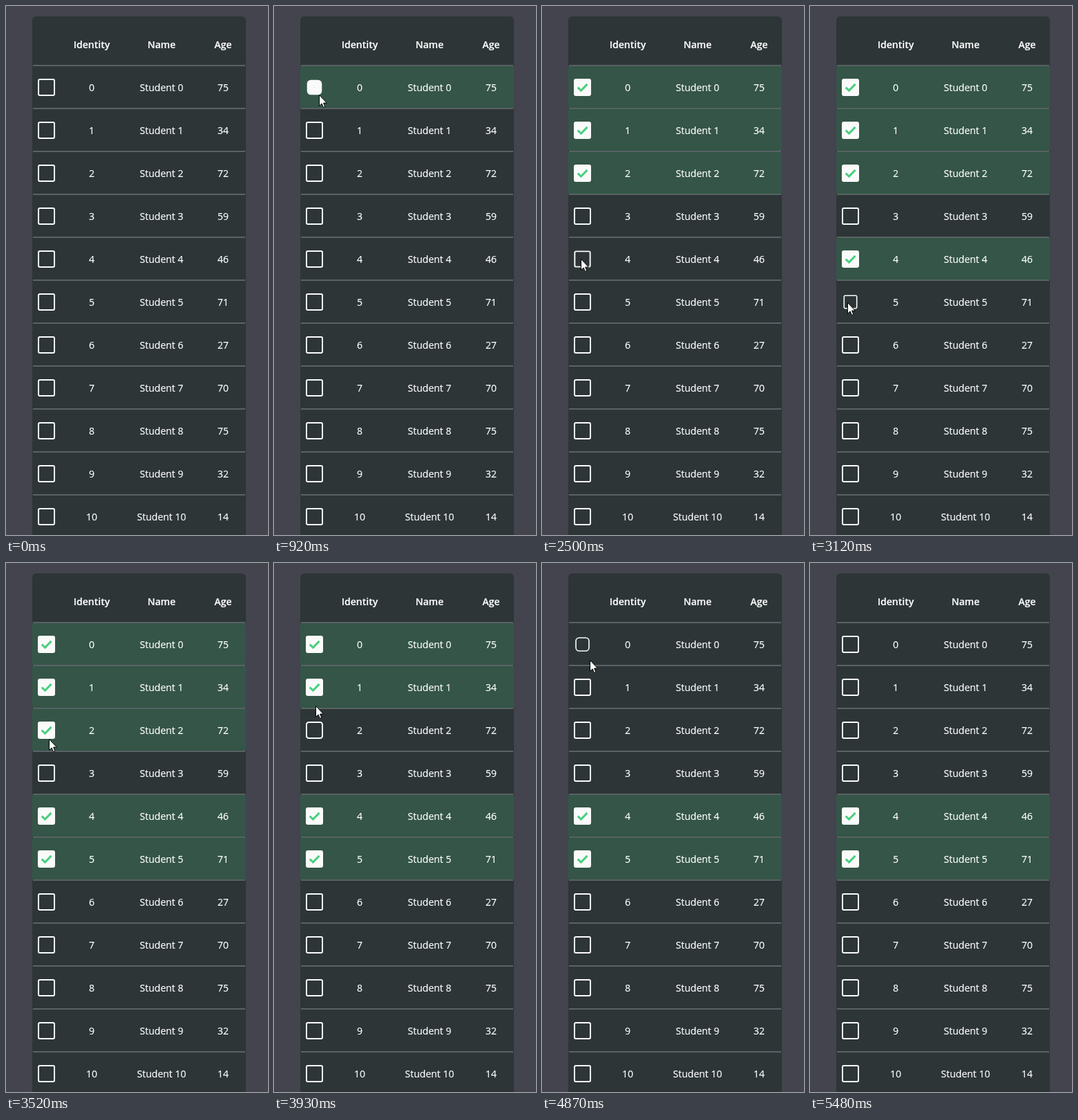
Recreate the animation shown at these times as an HTML page. Size 379 by 764 pixels, loop 5740 ms.

```html
<!DOCTYPE html>
<html lang="en">
<head>
<meta charset="utf-8">
<title>Student table</title>
<style>
  html, body { margin: 0; width: 100%; height: 100%; overflow: hidden; background: #43444d; }
  svg { display: block; width: 379px; height: 764px; }
  text {
    font: 14px "Open Sans", sans-serif; text-anchor: middle;
    fill: #fff; stroke: #fff; stroke-width: .2px;
  }
  .head { font-weight: 600; }
</style>
</head>
<body>
<svg id="stage" viewBox="0 0 379 764"></svg>
<script>
const LOOP = 5740, ENTER = 70, LEAVE = 5480;
const HOLD = 120, SHRINK = 70, GROW = 100;
const ROW_H = 62, TOP = 87;
const COLUMNS = [124, 225, 314];
const AGES = [75, 34, 72, 59, 46, 71, 27, 70, 75, 32, 14];

// each click toggles a row; up is the release time, x and y the pointer tip
const CLICKS = [
  { row: 0, up: 890, x: 65, y: 119 },
  { row: 1, up: 1420, x: 62, y: 184 },
  { row: 2, up: 1910, x: 62, y: 247 },
  { row: 4, up: 2610, x: 56, y: 365 },
  { row: 5, up: 3150, x: 54, y: 428 },
  { row: 2, up: 3760, x: 62, y: 243 },
  { row: 1, up: 4360, x: 59, y: 180 },
  { row: 0, up: 4860, x: 58, y: 118 }
];

// the pointer rests at each stop from "from" to "to" and glides between them
const STOPS = [
  { from: ENTER, to: ENTER, x: 298, y: 545 },
  { from: 400, to: 400, x: 140, y: 4 },
  ...CLICKS.map(({ up, x, y }) => ({ from: up - HOLD, to: up, x, y })),
  { from: LEAVE, to: LEAVE, x: 363, y: 755 }
];

const stage = document.getElementById('stage');

function add(tag, attrs, parent = stage, text) {
  const el = document.createElementNS('http://www.w3.org/2000/svg', tag);
  set(el, attrs);
  if (text !== undefined) el.textContent = text;
  parent.appendChild(el);
  return el;
}

function set(el, attrs) {
  for (const key in attrs) el.setAttribute(key, attrs[key]);
}

const clamp = v => Math.max(0, Math.min(1, v));
const mix = (a, b, k) => a + (b - a) * k;
const easeOut = k => 1 - (1 - k) ** 2;
const visible = on => on ? 'visible' : 'hidden';

const addLine = y => add('rect', { x: 39, y, width: 307, height: 2, fill: '#596264' });
const addTexts = (values, y, cls) => values.forEach((value, i) =>
  add('text', { x: COLUMNS[i], y, class: cls }, stage, value));

function addRow(age, i) {
  const y = TOP + i * ROW_H;
  const back = add('rect', { x: 38, y, width: 309, height: 60, fill: '#345547' });
  addLine(y + 60);
  addTexts([i, 'Student ' + i, age], y + 36, 'cell');
  const group = add('g', {});
  const box = add('rect', {
    x: -11.5, y: -11.5, width: 23, height: 23, stroke: '#fafafa', 'stroke-width': 2
  }, group);
  const check = add('path', {
    d: 'M-6.8 .2L-2 4.6L7 -4.6', fill: 'none', stroke: '#4bcf81', 'stroke-width': 3
  }, group);
  return { y: y + 30.5, back, group, box, check };
}

add('rect', { x: 38, y: 15, width: 309, height: 780, rx: 6, fill: '#2d3537' });
addTexts(['Identity', 'Name', 'Age'], 61, 'head');
addLine(TOP - 2);
const rows = AGES.map(addRow);

const pointer = add('path', {
  d: 'M.5 .5V16.3L4.1 12.9L6.4 18.4L8.8 17.5L6.6 12.1H11.4Z',
  fill: '#fff', stroke: '#000'
});

function drawRow(row, index, t) {
  let on = false, scale = 1, radius = 2, checkScale = 0;
  for (const click of CLICKS) {
    const since = t - click.up;
    if (click.row !== index || since < -HOLD) continue;
    if (since < 0) {
      scale = mix(1, 0.8, clamp((since + HOLD) / SHRINK));
    } else {
      on = !on;
      scale = mix(0.8, 1, clamp(since / GROW));
      radius = mix(6, 2, clamp(since / 260));
      checkScale = clamp((since - 10) / 150);
    }
  }
  set(row.back, { visibility: visible(on) });
  set(row.check, { visibility: visible(on), transform: `scale(${checkScale})` });
  set(row.box, { fill: on ? '#fafafa' : 'none', rx: radius });
  set(row.group, { transform: `translate(58.5 ${row.y}) scale(${scale})` });
}

function drawPointer(t) {
  const shown = t >= ENTER && t < LEAVE;
  set(pointer, { visibility: visible(shown) });
  if (!shown) return;
  const next = STOPS.findIndex(stop => stop.to > t);
  const a = STOPS[next - 1], b = STOPS[next];
  const k = easeOut(clamp((t - a.to) / (b.from - a.to)));
  const x = Math.round(mix(a.x, b.x, k)), y = Math.round(mix(a.y, b.y, k));
  set(pointer, { transform: `translate(${x} ${y})` });
}

function draw(t) {
  rows.forEach((row, i) => drawRow(row, i, t));
  drawPointer(t);
}

const start = performance.now();
function tick() {
  draw((performance.now() - start) % LOOP);
  requestAnimationFrame(tick);
}
tick();
</script>
</body>
</html>
```
